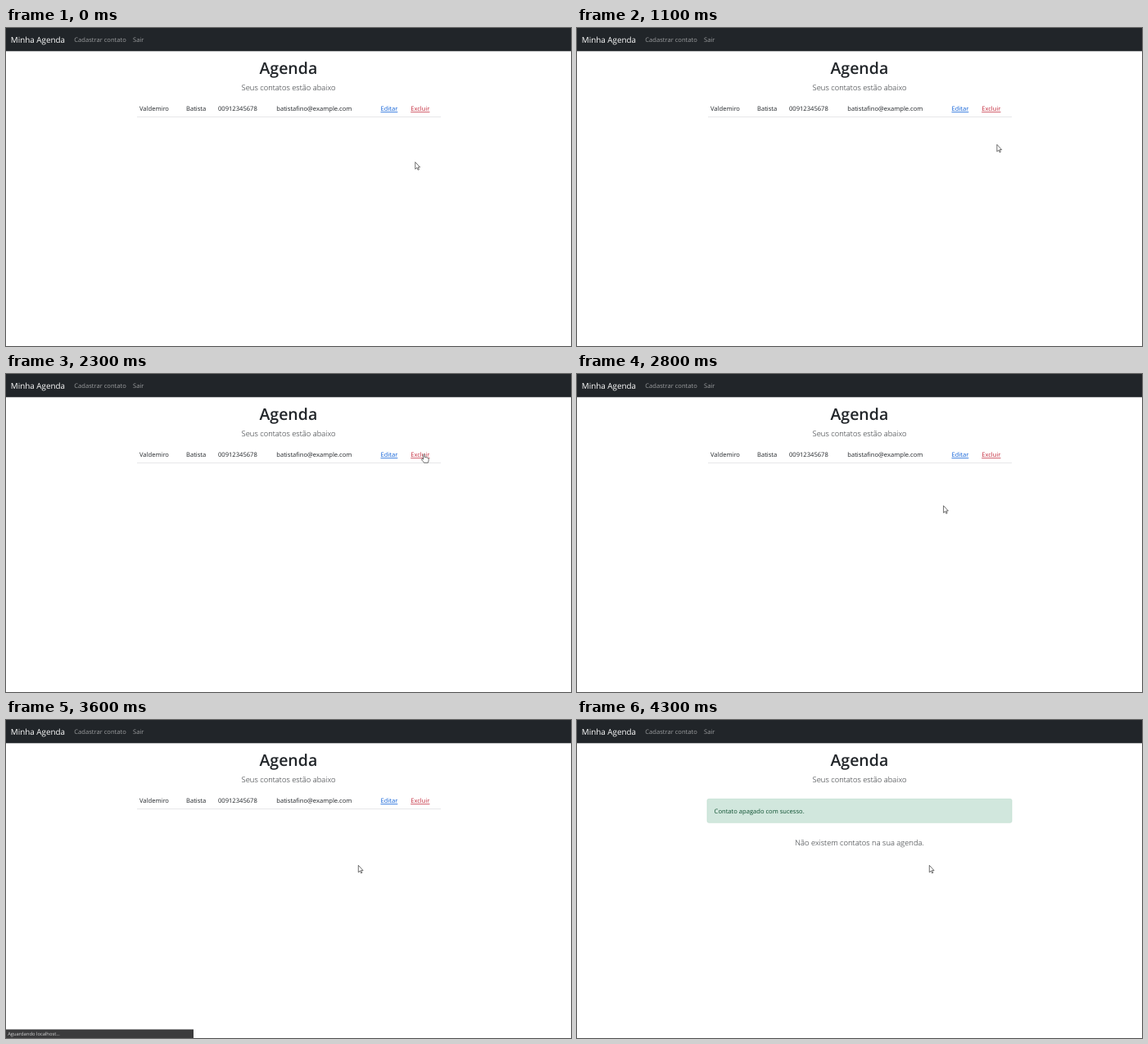
Recreate the animation shown at these times as an HTML page. Size 690 px wide and 388 px high, loop 5400 ms.

```html
<!DOCTYPE html>
<html lang="pt-BR">
<head>
<meta charset="utf-8">
<title>Minha Agenda</title>
<style>
  html, body { margin: 0; height: 100%; overflow: hidden; background: #fff; }
  svg { display: block; width: 100vw; height: 100vh; }
  text { font: 7.6px "Open Sans", "Noto Sans", sans-serif; fill: #212529; text-rendering: geometricPrecision; }
  .brand { font-size: 9.85px; fill: #fff; }
  .nav { fill: #9b9d9f; }
  .title { font-size: 19.5px; font-weight: 600; text-anchor: middle; }
  .lead { font-size: 9.4px; font-weight: 300; text-anchor: middle; }
  .edit { fill: #0b5ed7; text-decoration: underline; }
  .delete { fill: #c42f40; text-decoration: underline; }
  .success { fill: #0f5132; }
  .status { font-size: 5.8px; fill: #d4d4d4; }
  #cursor path { fill: #fff; stroke: #333; stroke-width: .7; stroke-linejoin: round; }
</style>
</head>
<body>
<svg viewBox="0 0 690 388">
  <rect width="690" height="28.3" fill="#212529"/>
  <text class="brand" x="5.8" y="18.3">Minha Agenda</text>
  <text class="nav" y="17.4"><tspan x="83.3">Cadastrar contato</tspan><tspan x="155">Sair</tspan></text>
  <text class="title" x="344.8" y="56.4">Agenda</text>
  <text class="lead" x="345" y="76.4">Seus contatos estão abaixo</text>

  <g id="contact">
    <text y="101.3">
      <tspan x="163">Valdemiro</tspan>
      <tspan x="220">Batista</tspan>
      <tspan x="259">00912345678</tspan>
      <tspan x="330.3">batistafino@example.com</tspan>
      <tspan x="457.5" class="edit">Editar</tspan>
      <tspan x="494.2" class="delete">Excluir</tspan>
    </text>
    <rect x="160" y="108" width="371" height="1" fill="#e6e7e9"/>
  </g>

  <g id="empty">
    <rect x="159" y="96.3" width="372" height="29" rx="2" fill="#d1e7dd" stroke="#badbcc" stroke-width=".6"/>
    <text class="success" x="167.6" y="113.6">Contato apagado com sucesso.</text>
    <text class="lead" x="345" y="153.1">Não existem contatos na sua agenda.</text>
  </g>

  <g id="status">
    <rect y="377.5" width="229" height="10.5" fill="#3b3b3c"/>
    <text class="status" x="2.2" y="385.2">Aguardando localhost...</text>
  </g>

  <g id="cursor">
    <path id="arrow" d="M0 0V8.6L2 6.8L3.3 9.6L4.6 9L3.3 6.3H5.8Z"/>
    <path id="hand" d="M-.9 6.6V.8Q0-.6 .9 .8V4Q5.6 4 5.6 6V8Q5.6 9 4.8 10.8H0Q-1 9-3.3 6.9Q-2.8 5.4-.9 6.6Z"/>
  </g>
</svg>
<script>
const LOOP = 5400, STEP = 100;
const DELETED = 4100, WAITING = 3600, FADE = 250;
const LINK_BOTTOM = 104;

// Pointer moves, each eased from wherever the last one ended
const home = { x: 499.8, y: 163.6 };
const moves = [
  { from: 700, to: 800, x: 513, y: 144.8 },
  { from: 900, to: 2300, x: 510.5, y: 97.5 },
  { from: 2550, to: 2800, x: 447.6, y: 160.7 },
  { from: 2900, to: 3300, x: 430.3, y: 177.3 }
];

const $ = id => document.getElementById(id);
const show = (id, on) => $(id).style.display = on ? "" : "none";
const clamp = v => Math.min(1, Math.max(0, v));
const ease = k => k * k * (3 - 2 * k);

function pointerAt(t) {
  let { x, y } = home;
  for (const m of moves) {
    const k = ease(clamp((t - m.from) / (m.to - m.from)));
    x += (m.x - x) * k;
    y += (m.y - y) * k;
  }
  return { x, y };
}

function draw(now) {
  const t = Math.floor(now % LOOP / STEP) * STEP;
  const { x, y } = pointerAt(t);
  const overLink = y < LINK_BOTTOM;
  $("cursor").setAttribute("transform", `translate(${x} ${y})`);
  show("hand", overLink);
  show("arrow", !overLink);
  show("contact", t < DELETED);
  show("empty", t >= DELETED);
  show("status", t >= WAITING);
  $("status").style.opacity = clamp(1 - (t + STEP - DELETED) / FADE);
}

const start = performance.now();
function tick() {
  draw(performance.now() - start);
  requestAnimationFrame(tick);
}
tick();
</script>
</body>
</html>
```
